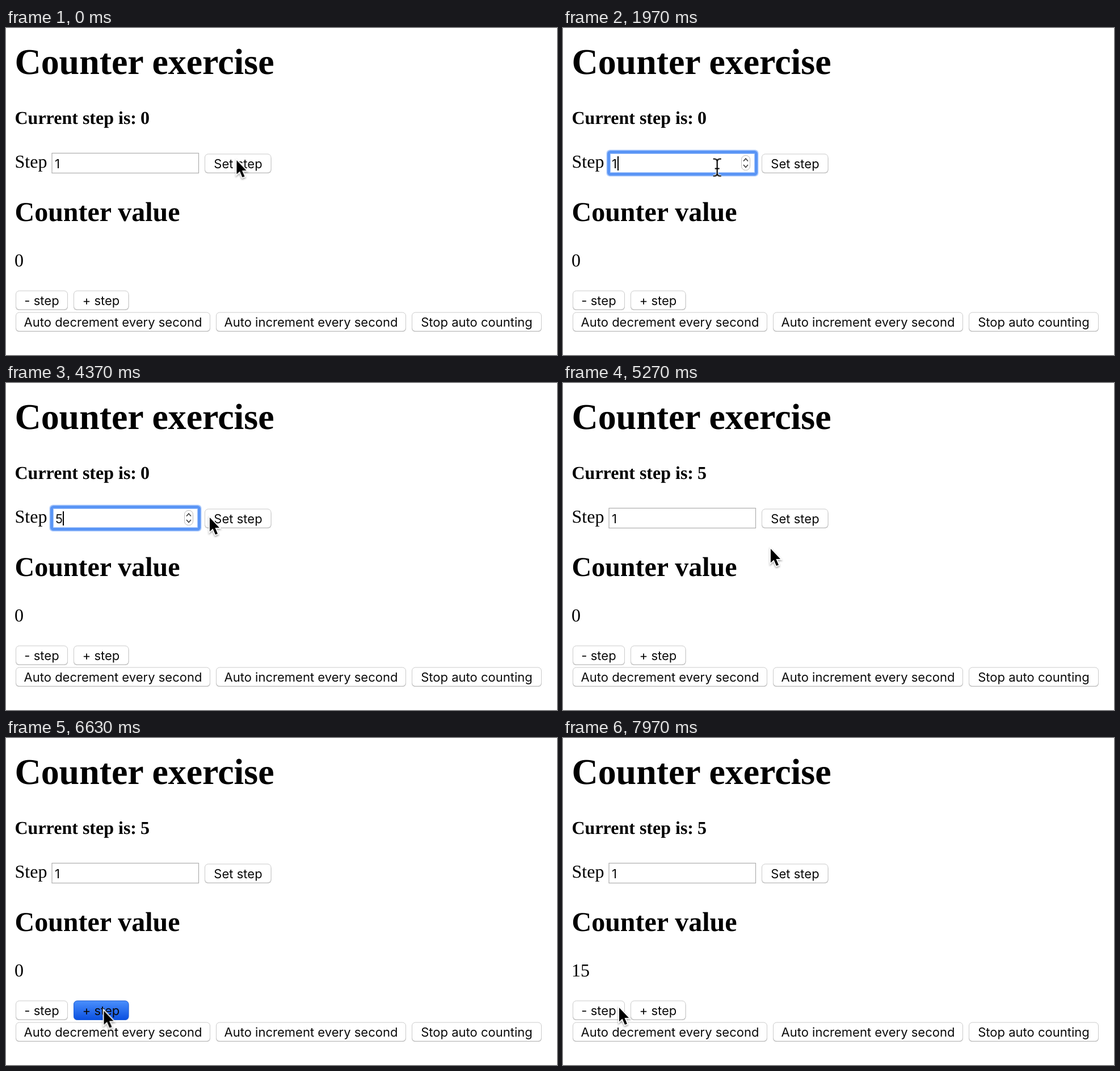
An HTML page that plays this animation: 971 px wide and 576 px high, repeating every 8 s.

```html
<!DOCTYPE html>
<html lang="en">
<head>
<meta charset="utf-8">
<title>Counter exercise</title>
<style>
html, body { margin: 0; width: 100%; height: 100%; overflow: hidden; background: #fff; }
svg { display: block; width: 971px; height: 576px; text-rendering: geometricPrecision; }
.serif { font-family: "Liberation Serif", Times, serif; font-size: 32px; }
.b { font-weight: 700; }
.h1 { font-size: 64px; letter-spacing: -.06px; }
.h2 { font-size: 48px; }
.ui { font-family: Inter, "Open Sans", sans-serif; font-size: 22px; letter-spacing: .01px; fill: #0a0a0a; }
.mid { text-anchor: middle; }
.btn rect { fill: #fff; stroke: #cbcbcb; }
.btn .under { fill: #b8b8b8; stroke: none; }
.press { fill: url(#blue); stroke: #1d5fdc; }

/* one 8 s loop: 1% = 80 ms */
.t { animation: 8s step-end infinite; }
.move { animation: path 8s linear infinite; }
.arrow { animation-name: arrow; filter: drop-shadow(0 2px 1.5px rgba(0,0,0,.35)); }
.beam { animation-name: beam; }
.focus { animation-name: focus; }
.spin { animation-name: spin; }
.caret1 { animation-name: caret1; }
.caret5 { animation-name: caret5; }
.sel { animation-name: sel; }
.in1 { animation-name: in1; }
.in5 { animation-name: in5; }
.step0 { animation-name: step0; }
.step5 { animation-name: step5; }
.pressSet { animation-name: pressSet; }
.pressPlus { animation-name: pressPlus; }
.n0 { animation-name: n0; }
.n5 { animation-name: n5; }
.n10 { animation-name: n10; }
.n15 { animation-name: n15; }

@keyframes path {
  0%, 2.5% { transform: translate(406.5px, 233px); }
  4.1% { transform: translate(338px, 230px); }
  5.875%, 8.375% { transform: translate(264px, 235px); }
  8.75%, 12.875% { transform: translate(266px, 236px); }
  15.375%, 17.875% { transform: translate(333px, 242px); }
  20%, 24.625% { transform: translate(273px, 245.5px); }
  27.125%, 30.375% { transform: translate(9px, 263px); }
  31.5% { transform: translate(60px, 254px); }
  34%, 34.4% { transform: translate(228px, 255.5px); }
  35.375%, 36.75% { transform: translate(248px, 271px); }
  37.125%, 50.375% { transform: translate(250px, 274px); }
  52.5% { transform: translate(300px, 255px); }
  54.625%, 54.9% { transform: translate(359px, 237px); }
  57.2%, 65% { transform: translate(393px, 236px); }
  65.875%, 66.1% { transform: translate(366px, 292px); }
  68% { transform: translate(302px, 372px); }
  71% { transform: translate(218px, 447px); }
  75%, 75.375% { transform: translate(168px, 489px); }
  76.25%, 97.5% { transform: translate(172.5px, 480.5px); }
  98.5% { transform: translate(140px, 481px); }
  99.6%, 100% { transform: translate(99px, 475px); }
}
@keyframes arrow {
  0%, 14.9%, 50.375%, 100% { visibility: visible; }
  4.1%, 18.5% { visibility: hidden; }
}
@keyframes beam {
  0%, 14.9%, 42.875%, 100% { visibility: hidden; }
  4.1%, 18.5% { visibility: visible; }
}
@keyframes focus { 0%, 57.5%, 100% { visibility: hidden; } 24.625% { visibility: visible; } }
@keyframes spin { 0%, 57.5%, 100% { visibility: hidden; } 4.1% { visibility: visible; } }
@keyframes caret1 { 0%, 26.3%, 100% { visibility: hidden; } 24.625% { visibility: visible; } }
@keyframes sel { 0%, 42.875%, 100% { visibility: hidden; } 26.3% { visibility: visible; } }
@keyframes caret5 { 0%, 57.5%, 100% { visibility: hidden; } 42.875% { visibility: visible; } }
@keyframes in1 { 0%, 59.125%, 100% { visibility: visible; } 42.875% { visibility: hidden; } }
@keyframes in5 { 0%, 59.125%, 100% { visibility: hidden; } 42.875% { visibility: visible; } }
@keyframes step0 { 0% { visibility: visible; } 59.125%, 100% { visibility: hidden; } }
@keyframes step5 { 0% { visibility: hidden; } 59.125%, 100% { visibility: visible; } }
@keyframes pressSet { 0%, 59.125%, 100% { visibility: hidden; } 57.5% { visibility: visible; } }
@keyframes pressPlus {
  0%, 84.125%, 87.875%, 92.875%, 100% { visibility: hidden; }
  82.6%, 86.25%, 90.6% { visibility: visible; }
}
@keyframes n0 { 0% { visibility: visible; } 84.125%, 100% { visibility: hidden; } }
@keyframes n5 { 0%, 87.875%, 100% { visibility: hidden; } 84.125% { visibility: visible; } }
@keyframes n10 { 0%, 92.875%, 100% { visibility: hidden; } 87.875% { visibility: visible; } }
@keyframes n15 { 0% { visibility: hidden; } 92.875%, 100% { visibility: visible; } }
</style>
</head>
<body>
<svg viewBox="0 0 971 576">
  <defs>
    <linearGradient id="blue" x2="0" y2="1">
      <stop offset="0" stop-color="#4a8ffc"/>
      <stop offset="1" stop-color="#0b50e0"/>
    </linearGradient>
    <path id="ibeam" d="M-7-15H-5Q0-15 0-10Q0-15 5-15H7M0-10V10M-7 15H-5Q0 15 0 10Q0 15 5 15H7M-4 2H4"/>
  </defs>

  <g class="serif" transform="translate(-.5 -.6)">
    <text class="b h1" x="16" y="82">Counter exercise</text>
    <text class="b" x="16" y="170">Current step is: </text>
    <text class="b t step0" x="237.5" y="170">0</text>
    <text class="b t step5" x="237.5" y="170">5</text>
    <text x="16" y="247">Step</text>
    <text class="b h2" x="16" y="341">Counter value</text>
    <text class="t n0" x="15.5" y="421">0</text>
    <text class="t n5" x="15.5" y="421">5</text>
    <text class="t n10" x="15.5" y="421">10</text>
    <text class="t n15" x="15.5" y="421">15</text>
  </g>

  <rect x="81" y="220.5" width="258.5" height="35" fill="#fff" stroke="#aeaeae" stroke-width="1.2"/>
  <g class="t focus" fill="none">
    <rect x="77.5" y="215.5" width="266" height="45" rx="5" stroke="#a9c8fb" stroke-width="2"/>
    <rect x="80.5" y="218.5" width="260" height="39" rx="3" stroke="#5a95f5" stroke-width="5"/>
    <rect x="83.5" y="221.5" width="254" height="33" stroke="#a9c8fb"/>
  </g>
  <rect class="t sel" x="86" y="225" width="11.5" height="27" fill="#b3d7fe"/>
  <g class="ui">
    <text class="t in1" x="86" y="247">1</text>
    <text class="t in5" x="87" y="247">5</text>
  </g>
  <rect class="t caret1" x="96" y="226" width="2" height="25"/>
  <rect class="t caret5" x="100" y="226" width="2" height="25"/>
  <g class="t spin" fill="none" stroke-linecap="round" stroke-linejoin="round">
    <rect x="314.5" y="224.5" width="15" height="26" rx="7" fill="#fff" stroke="#bbb"/>
    <path d="M318.5 234L322 230L325.5 234M318.5 241.5L322 245.5L325.5 241.5" stroke="#444" stroke-width="1.8"/>
  </g>

  <g class="btn">
    <rect class="under" x="350" y="224" width="117.5" height="32" rx="6"/>
    <rect x="350.5" y="222" width="116.5" height="33" rx="6"/>
    <rect class="under" x="17" y="465" width="92" height="32" rx="6"/>
    <rect x="17.5" y="463" width="91" height="33" rx="6"/>
    <rect class="under" x="119" y="465" width="97.5" height="32" rx="6"/>
    <rect x="119.5" y="463" width="96.5" height="33" rx="6"/>
    <rect class="under" x="17" y="503" width="343" height="32" rx="6"/>
    <rect x="17.5" y="501" width="342" height="33" rx="6"/>
    <rect class="under" x="370" y="503" width="335" height="32" rx="6"/>
    <rect x="370.5" y="501" width="334" height="33" rx="6"/>
    <rect class="under" x="715" y="503" width="229" height="32" rx="6"/>
    <rect x="715.5" y="501" width="228" height="33" rx="6"/>
  </g>
  <rect class="press t pressSet" x="350.5" y="222" width="116.5" height="33.5" rx="6"/>
  <rect class="press t pressPlus" x="119.5" y="463" width="96.5" height="33.5" rx="6"/>
  <g class="ui mid">
    <text x="409" y="247">Set step</text>
    <text x="63" y="488">- step</text>
    <text x="167.5" y="488">+ step</text>
    <text x="188.5" y="526">Auto decrement every second</text>
    <text x="537.5" y="526">Auto increment every second</text>
    <text x="829.5" y="526">Stop auto counting</text>
  </g>

  <g class="move">
    <g class="t beam" fill="none">
      <use href="#ibeam" stroke="#fff" stroke-width="4.5"/>
      <use href="#ibeam" stroke="#000" stroke-width="2.2"/>
    </g>
    <path class="t arrow" d="M0 0V24.5L5.5 19.5L10 30L14 28.5L9.5 18H17Z" stroke="#fff" stroke-width="3.5" paint-order="stroke"/>
  </g>
</svg>
</body>
</html>
```
